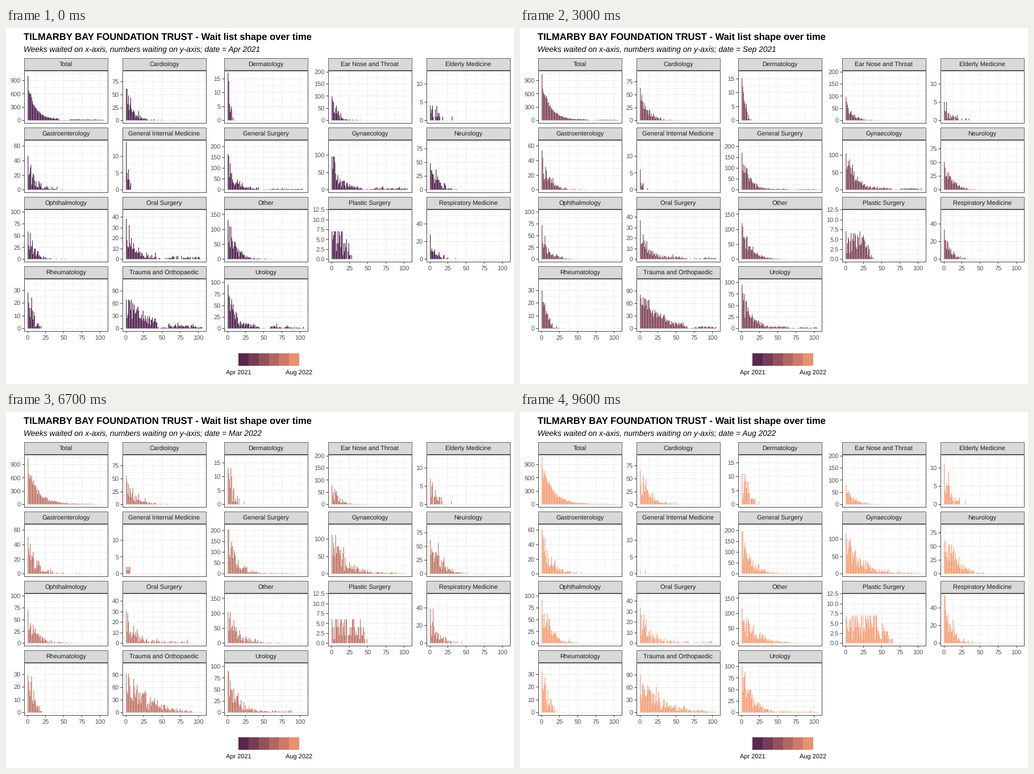
A matplotlib script that plays this animation: 894 px wide and 626 px high, repeating every 10 s.

```python
import numpy as np
import matplotlib.pyplot as plt
from matplotlib.animation import FuncAnimation
from matplotlib.collections import LineCollection, PolyCollection
from matplotlib.patches import Rectangle

W, H, DPI = 894, 626, 100
PX = 72 / DPI                      # points per pixel
WEEKS = np.arange(1, 106)
LAST = 16                          # index of the last month
SHIFT = 4.345                      # weeks per month
BACK = 75                          # room for cohorts that join later

LOW, HIGH = np.array([74, 28, 73]) / 255, np.array([247, 156, 115]) / 255
GRID, BORDER, EDGE, TICK = "#ebebeb", "#484848", "#666666", "#333333"

COLS = [31.5, 204.5, 383.5, 566.5, 739.5]
ROW0, PITCH = 52.5, 122
PW, PH, STRIP = 147.5, 92, 22
XMIN, XSPAN = -4.695, 115.39

rng = np.random.default_rng(5)
panels = []


def add(name, limit, step, first, last, spread, grow=1.3, shape=1.2, tail=0):
    """Random queue: a decaying envelope over cohorts that age with the months."""
    cohort = rng.uniform(0.45, 1.5, BACK + len(WEEKS))
    if tail:
        cohort[BACK + 43:BACK + 58] *= 0.12      # few joined in this spell
    counts = []
    for m in range(LAST + 1):
        s = m / LAST
        top = first * (last / first) ** s
        if 0 < m < LAST:
            top *= rng.uniform(0.85, 1.15)
        top = min(round(top), limit)
        width = spread * grow ** s
        env = 0.75 * top * np.exp(-(WEEKS / width) ** shape)
        env += tail * (1 - 0.6 * s) * (1 - WEEKS / 160)
        start = BACK - round(SHIFT * m)
        v = np.minimum(rng.poisson(env * cohort[start:start + len(WEEKS)]), top)
        v[0] = top
        counts.append(v)
    panels.append((name, limit, step, np.array(counts)))


# name, axis limit, axis step, first and last peak, decay in weeks
add("Cardiology", 92, 25, 61, 66, 11)
add("Dermatology", 17, 5, 17, 11, 5, grow=2.4, shape=2)
add("Ear Nose and Throat", 195, 50, 98, 80, 9)
add("Elderly Medicine", 13, 5, 4, 11, 10, grow=1)
add("Gastroenterology", 65, 20, 46, 60, 11)
add("General Internal Medicine", 14, 5, 14, 1, 3)
add("General Surgery", 220, 50, 165, 195, 11, tail=5)
add("Gynaecology", 136, 50, 95, 115, 11, grow=2, tail=7)
add("Neurology", 87, 25, 48, 60, 14, grow=1.7, shape=1.7)
add("Ophthalmology", 100, 25, 58, 90, 11)
add("Oral Surgery", 45, 10, 38, 33, 10, tail=2.5)
add("Other", 159, 50, 131, 115, 12, grow=1.7)
add("Plastic Surgery", 12, 2.5, 7, 7, 25, grow=2.3, shape=8)
add("Respiratory Medicine", 54, 20, 28, 54, 9)
add("Rheumatology", 37, 10, 28, 32, 10, grow=1, shape=1.8)
add("Trauma and Orthopaedic", 113, 30, 68, 90, 28, grow=1, tail=7)
add("Urology", 103, 25, 95, 100, 11, tail=5)

total = np.minimum(sum(p[3] for p in panels), 1071)
panels.insert(0, ("Total", 1071, 300, total))

plt.rcParams["font.family"] = "Liberation Sans"
plt.rcParams["text.hinting"] = "none"
fig = plt.figure(figsize=(W / DPI, H / DPI), dpi=DPI, facecolor="white")
ax = fig.add_axes([0, 0, 1, 1])
ax.set(xlim=(0, W), ylim=(H, 0))
ax.axis("off")


def text(x, y, s, size=10.95, color="black", ha="left", **kw):
    return ax.text(x, y, s, fontsize=size * PX, color=color, ha=ha,
                   va="baseline", **kw)


def box(x, y, w, h, fill, edge):
    ax.add_patch(Rectangle((x, y), w, h, fc=fill, ec=edge, lw=PX, zorder=4))


def lines(segs, color, width, z):
    ax.add_collection(LineCollection(segs, colors=color, linewidths=width * PX, zorder=z))


def shade(t):
    return LOW + (HIGH - LOW) * t


def px(week, left):
    return left + (week - XMIN) * PW / XSPAN


minor, major, ticks = [], [], []
geometry = []                      # left, zero line, pixels per unit
for i, (name, limit, step, _) in enumerate(panels):
    left, strip = COLS[i % 5], ROW0 + PITCH * (i // 5)
    top = strip + STRIP
    bottom = top + PH
    zero = bottom - PH * 0.05 / 1.1
    unit = PH / (1.1 * limit)
    geometry.append((left, zero, unit))

    for k in range(9):
        x = px(12.5 * k, left)
        (minor if k % 2 else major).append([(x, top), (x, bottom)])
    for k in range(int(limit * 1.05 / step * 2) + 1):
        value = k * step / 2
        y = zero - value * unit
        (minor if k % 2 else major).append([(left, y), (left + PW, y)])
        if k % 2 == 0:
            ticks.append([(left - 3.5, y), (left, y)])
            label = f"{value:.1f}" if step == 2.5 else f"{value:.0f}"
            text(left - 5.7, y + 4, label, color="#4d4d4d", ha="right")

    box(left, top, PW, PH, "none", BORDER)
    box(left, strip, PW, STRIP - 1, "#d9d9d9", EDGE)
    text(left + PW / 2, strip + 15.5, name, color="#1a1a1a", ha="center", zorder=5)

    if i + 5 >= len(panels):
        for week in range(0, 101, 25):
            x = px(week, left)
            ticks.append([(x, bottom), (x, bottom + 3.5)])
            text(x, bottom + 15, str(week), color="#4d4d4d", ha="center")

lines(minor, GRID, 0.6, 1)
lines(major, GRID, 1, 1.5)
lines(ticks, TICK, 1, 3)

text(31, 20, "TILMARBY BAY FOUNDATION TRUST - Wait list shape over time",
     16.66, weight="bold")
subtitle = text(31, 42, "", 13.82, style="italic")

SWATCH = 107 / 6
for k in range(6):
    ax.add_patch(Rectangle((409 + k * SWATCH, 572), SWATCH, 22,
                           fc=shade((k + 0.5) / 6), lw=0))
text(409, 609, "Apr 2021", ha="center")
text(516, 609, "Aug 2022", ha="center")

bars = PolyCollection([], linewidths=0, edgecolors="none", zorder=2)
bars.set_snap(False)
ax.add_collection(bars, autolim=False)

NAMES = "Jan Feb Mar Apr May Jun Jul Aug Sep Oct Nov Dec".split()
CHANGES = [*range(6, 91, 6), 95]


def draw(frame):
    # the frame on which a month changes shows the halfway blend
    month = sum(c <= frame for c in CHANGES)
    prev = month - 1 if frame in CHANGES else month
    verts = []
    for (left, zero, unit), (*_, counts) in zip(geometry, panels):
        values = (counts[prev] + counts[month]) / 2
        for week, v in zip(WEEKS, values):
            if v > 0:
                a, b = px(week - 0.45, left), px(week + 0.45, left)
                y = zero - v * unit
                verts.append([(a, zero), (a, y), (b, y), (b, zero)])
    bars.set_verts(verts)
    bars.set_facecolor(shade((prev + month) / 2 / LAST))
    date = f"{NAMES[(month + 3) % 12]} {2021 + (month + 3) // 12}"
    subtitle.set_text("Weeks waited on x-axis, numbers waiting on y-axis; "
                      f"date = {date}")
    return bars, subtitle


anim = FuncAnimation(fig, draw, frames=100, interval=100, repeat=True, repeat_delay=0)
plt.show()
```
